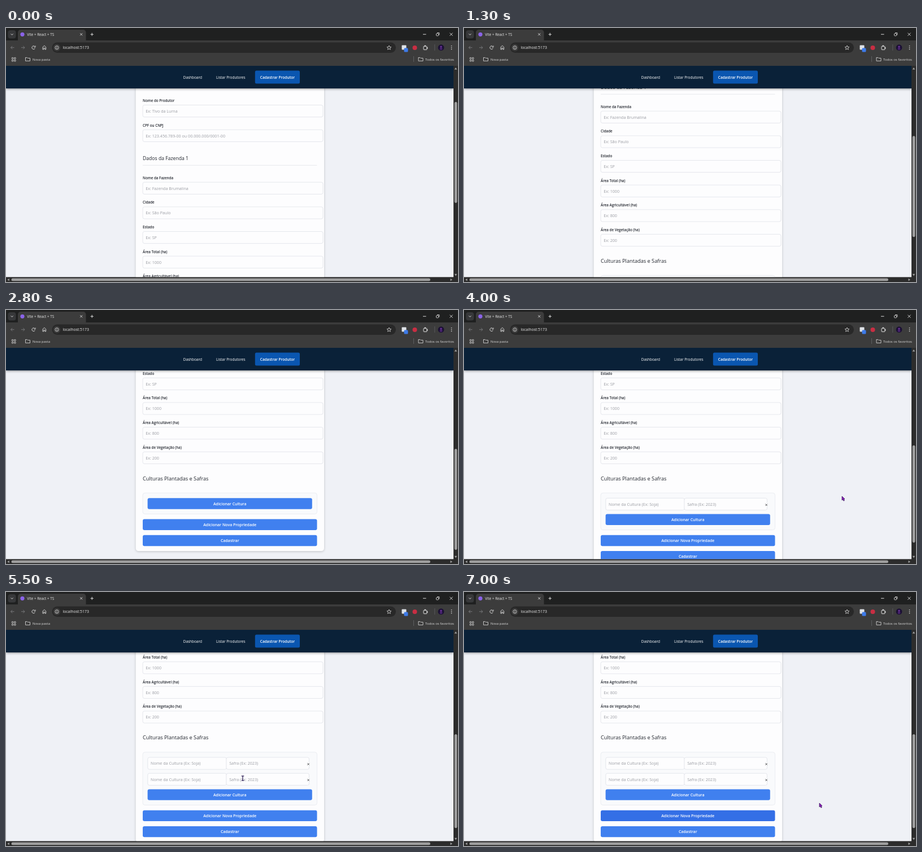
An HTML page with a canvas for the animation above (7100 ms loop, 800x450 px).

```html
<!DOCTYPE html>
<html lang="pt-BR">
<head>
<meta charset="utf-8">
<title>Cadastro</title>
<style>
  html, body { margin: 0; width: 100%; height: 100%; overflow: hidden; background: #3c3c3c; }
  canvas { display: block; width: 800px; height: 450px; }
</style>
</head>
<body>
<canvas id="stage" width="800" height="450"></canvas>
<script>
const ctx = document.getElementById('stage').getContext('2d');
const LOOP = 7100, STEP = 100;
const FONT = '"Open Sans", "Noto Sans", sans-serif';
const BLUE = '#4080ef', BLUE_HOT = '#346fe6';
const ROW = 28.2;

const scrollKeys = [[0, 0], [1300, 126], [2100, 193.6], [2800, 240.2], [5000, 240.2], [5400, 280.5]];
const pointerKeys = [
  [2900, 440, 352], [3200, 440, 346], [3500, 540, 340], [4000, 669, 330], [4200, 669, 330],
  [4600, 430, 368], [4900, 425, 368], [5300, 419, 330], [5700, 419, 330],
  [6300, 470, 392], [6700, 490, 394], [7000, 629, 374]
];

// Linear interpolation between rows of [time, ...values].
function track(keys, t) {
  const i = keys.findIndex(k => k[0] > t);
  if (i < 0) return keys[keys.length - 1].slice(1);
  if (i === 0) return keys[0].slice(1);
  const a = keys[i - 1], b = keys[i], p = (t - a[0]) / (b[0] - a[0]);
  return a.slice(1).map((v, n) => v + (b[n + 1] - v) * p);
}

function box(x, y, w, h, r, fill, stroke, width = 0.7) {
  ctx.beginPath();
  ctx.roundRect(x, y, w, h, r);
  if (fill) { ctx.fillStyle = fill; ctx.fill(); }
  if (stroke) { ctx.strokeStyle = stroke; ctx.lineWidth = width; ctx.stroke(); }
}

function dot(x, y, r, fill) {
  ctx.beginPath();
  ctx.arc(x, y, r, 0, Math.PI * 2);
  ctx.fillStyle = fill;
  ctx.fill();
}

function line(points, color, width = 1, fill) {
  ctx.beginPath();
  points.forEach(([x, y], i) => i ? ctx.lineTo(x, y) : ctx.moveTo(x, y));
  if (fill) { ctx.closePath(); ctx.fillStyle = fill; ctx.fill(); }
  if (color) { ctx.strokeStyle = color; ctx.lineWidth = width; ctx.stroke(); }
}

function text(str, x, y, size, color, weight = 400, align = 'left') {
  ctx.font = `${weight} ${size}px ${FONT}`;
  ctx.textAlign = align;
  ctx.fillStyle = color;
  ctx.fillText(str, x, y + size * 0.36);
}

function shadowed(color, blur, dy, draw) {
  ctx.save();
  ctx.shadowColor = color;
  ctx.shadowBlur = blur;
  ctx.shadowOffsetY = dy;
  draw();
  ctx.restore();
}

function cross(x, y, r, color, width) {
  line([[x - r, y - r], [x + r, y + r]], color, width);
  line([[x + r, y - r], [x - r, y + r]], color, width);
}

function input(x, y, w, hint) {
  box(x, y, w, 21.2, 3, '#fdfdfe', '#dcdfe5');
  text(hint, x + 5.2, y + 10.9, 7.15, '#9b9da3');
}

function field(y, label, hint) {
  text(label, 242, y, 6.25, '#20242c', 600);
  input(242, y + 7.8, 319, hint);
}

function button(x, y, w, label, hot) {
  box(x, y, w, 19.4, 3, hot ? BLUE_HOT : BLUE);
  text(label, x + w / 2, y + 9.8, 6.95, '#fff', 600, 'center');
}

function form(scroll, rows, hotCulture, hotFarm) {
  const grow = rows * ROW;
  ctx.save();
  ctx.beginPath();
  ctx.rect(0, 67, 792, 374.5);
  ctx.clip();
  ctx.fillStyle = '#eff1f6';
  ctx.fillRect(0, 67, 792, 375);
  ctx.translate(0, -scroll);

  shadowed('rgba(0,0,0,.2)', 4, 1, () => box(229.7, 60, 333.3, 607.3 + grow, 5, '#fdfdfe'));
  field(128.7, 'Nome do Produtor', 'Ex: Tivo da Lurna');
  field(172.4, 'CPF ou CNPJ', 'Ex: 123.456.789-00 ou 00.000.000/0001-00');
  text('Dados da Fazenda 1', 242, 231.2, 8.65, '#20242c', 500);
  line([[242, 243.3], [550.5, 243.3]], '#e3e5ea', 0.8);
  [['Nome da Fazenda', 'Ex: Fazenda Brumalina'], ['Cidade', 'Ex: São Paulo'], ['Estado', 'Ex: SP'],
   ['Área Total (ha)', 'Ex: 1000'], ['Área Agricultável (ha)', 'Ex: 800'], ['Área de Vegetação (ha)', 'Ex: 200']]
    .forEach(([label, hint], i) => field(265.4 + i * 43.65, label, hint));

  text('Culturas Plantadas e Safras', 242, 538.6, 9.2, '#20242c', 500);
  box(242, 564.3, 308.5, 37.3 + grow, 4, '#f9fafc', '#e4e7ec');
  for (let i = 0; i < rows; i++) {
    const y = 573.5 + i * ROW;
    input(250.8, y, 139.5, 'Nome da Cultura (Ex: Soja)');
    input(390, y, 146.5, 'Safra (Ex: 2023)');
    ctx.fillStyle = '#f9fafc';
    ctx.fillRect(533, y + 8, 5, 7);
    cross(535.2, y + 12, 1.7, '#333', 0.8);
  }
  button(250.6, 573.5 + grow, 291.2, 'Adicionar Cultura', hotCulture);
  button(242, 610.8 + grow, 308.5, 'Adicionar Nova Propriedade', hotFarm);
  button(242, 639 + grow, 308.5, 'Cadastrar', false);
  ctx.restore();
}

function navigation() {
  shadowed('rgba(0,0,0,.45)', 4, 1, () => {
    ctx.fillStyle = '#0a2138';
    ctx.fillRect(0, 67, 792, 40);
  });
  text('Dashboard', 313.7, 87.2, 6.45, '#fff', 400);
  text('Listar Produtores', 372, 87.2, 6.45, '#fff', 400);
  box(440.8, 75.6, 79.2, 22.8, 2.5, '#0a56b0');
  text('Cadastrar Produtor', 480.4, 87.2, 6.6, '#fff', 600, 'center');
}

function folder(x, y) {
  line([[x, y - 3], [x + 3, y - 3], [x + 4, y - 2], [x + 8, y - 2], [x + 8, y + 3], [x, y + 3], [x, y - 3.4]], '#d0d0d0', 0.9);
}

function chrome() {
  const ink = '#dcdcdc', dim = '#77787a';
  ctx.fillStyle = '#1f2020';
  ctx.fillRect(0, 0, 800, 23);
  ctx.fillStyle = '#3c3c3c';
  ctx.fillRect(0, 22, 800, 45);
  box(3.5, 4, 14, 14.5, 4, '#37383a');
  line([[8.6, 10.3], [10.6, 12.3], [12.6, 10.3]], ink);
  box(21, 3, 120.5, 22, [5, 5, 0, 0], '#3c3c3c');
  dot(29, 11.3, 3.6, '#8a63e8');
  text('Vite + React + TS', 37.2, 11.5, 6.3, '#e8e8e8');
  cross(133.2, 11.3, 2, ink, 0.9);
  line([[149.6, 11.3], [154.8, 11.3]], ink);
  line([[152.2, 8.7], [152.2, 13.9]], ink);
  line([[738, 11.2], [743.5, 11.2]], ink);
  box(761.5, 9.8, 4, 4, 1, null, ink, 0.9);
  line([[763, 8.5], [766.8, 8.5], [766.8, 12.5]], ink, 0.9);
  cross(788, 11.2, 2.6, ink, 0.9);

  for (const [x, d] of [[11.5, -1], [30, 1]]) {
    line([[x - 3, 34.7], [x + 3, 34.7]], dim);
    line([[x + d * 0.3, 32], [x + d * 3, 34.7], [x + d * 0.3, 37.4]], dim);
  }
  ctx.beginPath();
  ctx.arc(48.8, 34.7, 2.9, 0.5, 5.5);
  ctx.strokeStyle = ink;
  ctx.lineWidth = 1;
  ctx.stroke();
  line([[52, 31.3], [52, 34], [49.3, 34]], ink, 0.9);
  line([[65, 38], [65, 33.8], [67.8, 31.3], [70.6, 33.8], [70.6, 38], [68.8, 38], [68.8, 35.6], [66.8, 35.6], [66.8, 38], [65, 38]], ink, 0.9);

  box(81.5, 25.6, 608.5, 18.4, 9.2, '#282828');
  dot(90, 34.8, 6.2, '#3c3c3c');
  ctx.beginPath();
  ctx.arc(90, 34.8, 3.1, 0, 7);
  ctx.lineWidth = 0.8;
  ctx.stroke();
  line([[90, 34.3], [90, 36.6]], ink, 0.9);
  dot(90, 33, 0.5, ink);
  text('localhost:5173', 100.4, 34.9, 6.9, '#ececec');

  const star = Array.from({ length: 11 }, (_, i) => {
    const a = i * Math.PI / 5 - Math.PI / 2, r = i % 2 ? 1.8 : 4;
    return [678 + r * Math.cos(a), 35 + r * Math.sin(a)];
  });
  line(star, ink, 0.8);
  box(700.5, 30.5, 8, 8, 1, '#dfe3e8');
  box(704.5, 35.5, 7, 7, 1.5, '#3d7bea');
  dot(723.5, 35, 4, '#c92e43');
  box(739, 32.3, 6, 6.2, 1, null, ink, 1);
  dot(741.8, 31.8, 1.2, ink);
  dot(745.4, 35.4, 1.2, ink);
  line([[758.8, 29], [758.8, 40]], '#626365', 0.8);
  dot(770, 34.7, 5.4, '#1b1034');
  dot(770, 33.2, 1.8, '#643092');
  box(767.8, 34.8, 4.4, 4, 1.5, '#48236f');
  for (const y of [31.8, 34.7, 37.6]) dot(788.5, y, 0.8, ink);

  for (const x of [10.4, 14.6])
    for (const y of [52.4, 56.6]) box(x, y, 2.5, 2.5, 0.3, null, ink, 0.8);
  folder(34.5, 55.4);
  text('Nova pasta', 47, 55.4, 5.95, ink);
  line([[721.5, 50], [721.5, 60]], '#66676a', 0.8);
  folder(730, 55.4);
  text('Todos os favoritos', 742, 55.4, 6, ink);
}

function scrollbars(scroll, rows) {
  const scale = 357 / (746 + rows * ROW), grey = '#9f9f9f';
  ctx.fillStyle = '#2c2c2c';
  ctx.fillRect(792, 67, 8, 383);
  ctx.fillRect(0, 441.5, 800, 8.5);
  box(793.7, 76 + (scroll + 115) * scale, 4.8, 374 * scale, 2.4, grey);
  box(9.5, 443.5, 741.5, 4.8, 2.4, grey);
  line([[793.7, 73.5], [796, 70], [798.3, 73.5]], null, 0, grey);
  line([[793.7, 435.7], [796, 439.2], [798.3, 435.7]], null, 0, grey);
  line([[5.8, 443.7], [2.3, 446], [5.8, 448.3]], null, 0, grey);
  line([[786.5, 443.7], [790, 446], [786.5, 448.3]], null, 0, grey);
}

function pointer(x, y, beam) {
  if (beam) {
    for (const [color, width] of [['#ffffff', 2.4], ['#24154f', 1.2]]) {
      line([[x - 2.3, y - 4], [x + 2.3, y - 4]], color, width);
      line([[x, y - 4], [x, y + 4]], color, width);
      line([[x - 2.3, y + 4], [x + 2.3, y + 4]], color, width);
    }
    return;
  }
  const shape = [[0, 0], [0, 7], [1.6, 5.7], [2.9, 8.2], [4.3, 7.5], [3.2, 5.1], [5, 4.8], [0, 0]];
  line(shape.map(([a, b]) => [x + a, y + b]), '#2b1050', 0.7, '#8b1cb8');
}

function draw(t) {
  const [scroll] = track(scrollKeys, t);
  const rows = t < 3200 ? 0 : t < 4800 ? 1 : 2;
  const hotCulture = (t >= 2900 && t < 3200) || (t >= 4600 && t < 5000);
  form(scroll, rows, hotCulture, t >= 6300);
  navigation();
  chrome();
  scrollbars(scroll, rows);
  if (t >= 2900) {
    const [x, y] = track(pointerKeys, t);
    pointer(x, y, t >= 5100 && t < 5900);
  }
}

function tick(now) {
  draw(Math.floor((now % LOOP) / STEP) * STEP);
  requestAnimationFrame(tick);
}
requestAnimationFrame(tick);
</script>
</body>
</html>
```
